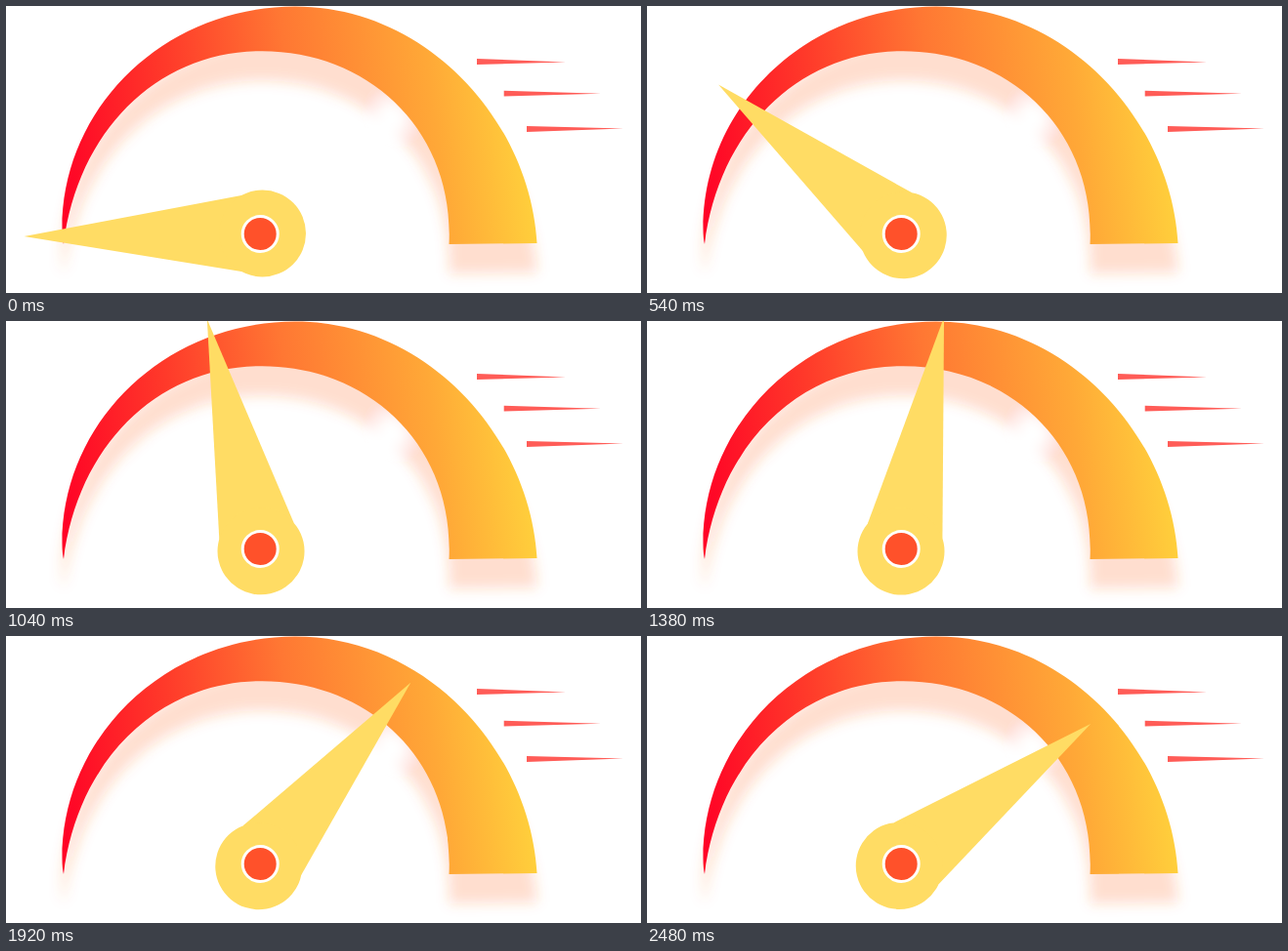
An HTML page that plays this animation: 650 by 294 pixels, repeating every 2500 ms.

```html
<!DOCTYPE html>
<html lang="en">
<head>
<meta charset="utf-8">
<title>Gauge</title>
<style>
  html, body { margin: 0; width: 100%; height: 100%; overflow: hidden; background: #fff; }
  svg { display: block; width: 100%; height: 100%; }
</style>
</head>
<body>
<svg viewBox="0 0 650 294">
  <defs>
    <linearGradient id="heat" gradientUnits="userSpaceOnUse" x1="62" y1="210" x2="540" y2="150">
      <stop offset="0" stop-color="#ff0326"/>
      <stop offset=".25" stop-color="#ff3a2a"/>
      <stop offset=".5" stop-color="#ff7733"/>
      <stop offset=".8" stop-color="#ffa837"/>
      <stop offset="1" stop-color="#ffd23c"/>
    </linearGradient>
    <filter id="soft" filterUnits="userSpaceOnUse" x="0" y="-40" width="650" height="380">
      <feGaussianBlur stdDeviation="6.5"/>
    </filter>
    <path id="band" d="M59 244 Q57.5 238 57.5 228 C57.5 102 164 .5 296 .5
      C430 .5 536 117 543.5 243 L453.5 244
      C459 128 372 46.2 262 46.2 C156 46.2 74 126.5 59 244Z"/>
  </defs>

  <g filter="url(#soft)">
    <use href="#band" y="30" fill="#ff6a2c" opacity=".22"/>
    <ellipse cx="396" cy="113" rx="13" ry="18" fill="#fff" transform="rotate(-40 396 113)"/>
  </g>
  <use href="#band" fill="url(#heat)"/>

  <path fill="#ff5c57" d="M482 54 L573 57.5 L482 60Z M509.7 86.8 L609 89.8 L509.7 92.5Z M533 123 L632 125.6 L533 129Z"/>

  <g id="needle" fill="#ffdc64">
    <path d="M18.5 236 L241 194 L262 233 L241 272Z"/>
    <circle cx="262.5" cy="233" r="44.5"/>
  </g>
  <circle cx="260.2" cy="233.5" r="18" fill="#ff512a" stroke="#fff" stroke-width="3"/>
</svg>
<script>
  const LOOP = 2500, STEP = 20, SWEEP = 144.2;
  const needle = document.getElementById('needle');

  // Brisk start, settling towards the end
  const ease = s => s * (1.2 + s * (0.53 - 0.73 * s));

  function draw(ms) {
    const t = Math.floor((ms % LOOP) / STEP) * STEP;
    const angle = SWEEP * ease(t / LOOP);
    needle.setAttribute('transform', `rotate(${angle.toFixed(3)} 260 233.5)`);
  }

  const start = performance.now();
  function tick() {
    draw(performance.now() - start);
    requestAnimationFrame(tick);
  }
  tick();
</script>
</body>
</html>
```
